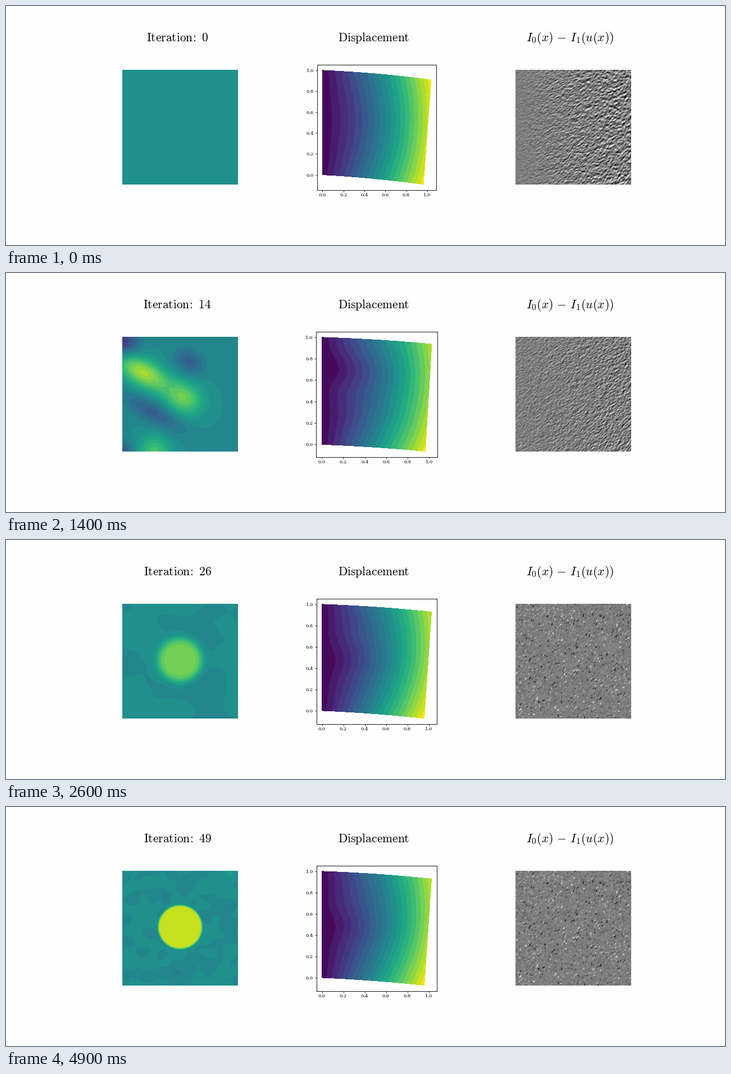
Animation of 1280 by 427 pixels, one loop 5000 ms. Source, as a matplotlib script:

```python
import numpy as np
import matplotlib.pyplot as plt
from matplotlib.animation import FuncAnimation

W, H, DPI = 1280, 427, 64
PT = 72 / DPI            # points per pixel
FRAMES, STEP = 50, 100
COLS, ROWS = 206, 205    # size of the outer panels
TOP, HIGH = 104.7, 224   # middle axes
BG = "#fefefe"

plt.rcParams["mathtext.fontset"] = "cm"
plt.rcParams["font.family"] = "DejaVu Serif"

fig = plt.figure(figsize=(W / DPI, H / DPI), dpi=DPI, facecolor=BG)
rng = np.random.default_rng(7)


def box(x, y, w, h):
    """Pixel box, measured from the top left, as figure fractions."""
    return [x / W, 1 - (y + h) / H, w / W, h / H]


def label(x, text, px):
    return fig.text(x / W, 1 - 63 / H, text, fontsize=px * PT,
                    ha="center", va="baseline", color="black")


def panel(x, cmap):
    ax = fig.add_axes(box(x, 114, COLS, ROWS))
    ax.axis("off")
    return ax.imshow(np.zeros((ROWS, COLS)), cmap=cmap, vmin=0, vmax=1,
                     interpolation="nearest", aspect="auto")


def ease(i, start, end):
    t = np.clip((i - start) / (end - start), 0, 1)
    return t * t * (3 - 2 * t)


def mix(a, b, k):
    return a + (b - a) * k


def bump(x, centre, width):
    return np.exp(-((x - centre) / width)**2)


def decay(i):
    return np.exp(-i / 5)


def kick(i):
    """Short disturbance when the parameter starts to move."""
    return bump(i, 14, 2.5)


def noise(long, short, angle=0, n=256):
    """Smooth random texture of unit spread, stretched along one direction."""
    fy, fx = np.meshgrid(np.fft.fftfreq(n), np.fft.fftfreq(n), indexing="ij")
    a = np.radians(angle)
    f1 = fx * np.cos(a) - fy * np.sin(a)
    f2 = fx * np.sin(a) + fy * np.cos(a)
    kernel = np.exp(-2 * np.pi**2 * ((long * f1)**2 + (short * f2)**2))
    t = np.fft.ifft2(np.fft.fft2(rng.normal(size=(n, n))) * kernel).real
    return (t - t.mean()) / t.std()


# ---- parameter field -------------------------------------------------------
U, V = np.meshgrid((np.arange(COLS) + 0.5) / COLS,
                   (np.arange(ROWS) + 0.5) / ROWS)
COARSE = noise(20, 14)[:ROWS, :COLS]
FINE = noise(8, 7)[:ROWS, :COLS]
RADIUS = np.hypot(U - 0.5, V - 0.49)
FAINT = np.where(U < 0.65 - 0.37 * ease(V, 0.1, 1.2), 0.508, 0.5)


def blob(amp, cx, cy, sx, sy):
    """Soft hill whose long axis falls to the right."""
    p = 0.87 * (U - cx) + 0.5 * (V - cy)
    q = 0.87 * (V - cy) - 0.5 * (U - cx)
    return amp * bump(p, 0, sx) * bump(q, 0, sy)


def wander(k):
    """Hills sliding towards the middle while the valleys fill up."""
    hills = (blob(mix(0.40, 0.30, k), mix(0.17, 0.28, k), mix(0.30, 0.42, k),
                  mix(0.27, 0.14, k), 0.12)
             + blob(0.28, mix(0.54, 0.50, k), mix(0.54, 0.50, k), 0.17, 0.14)
             + blob(mix(0.25, 0.05, k), 0.28, 1, 0.14, 0.14))
    valleys = (blob(-0.32, 0, mix(0, 0.35, k), 0.14, 0.12)
               + blob(mix(-0.2, 0, k), 0.27, 0.66, 0.28, 0.09)
               + blob(mix(-0.2, 0, k), 0.58, 0.22, 0.13, 0.10)
               + blob(-0.2, 0, 1, 0.09, 0.09))
    return 0.475 + hills + valleys


def settle(i):
    """Quiet ground with one disc that sharpens and brightens."""
    k = ease(i, 22, 49)
    ground = 0.482 + 0.016 * mix(COARSE, FINE, k)
    soft = 0.003 + 0.03 * np.exp(-(i - 22) / 8)
    disc = 1 / (1 + np.exp(np.clip((RADIUS - 0.19) / soft, -50, 50)))
    return mix(ground, mix(0.78, 0.91, ease(i, 22, 42)), disc)


def parameter(i):
    if i < 7:
        return np.full_like(U, 0.5)
    if i < 13:
        return FAINT
    f = wander(ease(i, 13, 18))
    if i > 18:
        f = mix(f, settle(i), ease(i, 18, 25))
    return np.round(f * 24) / 24


# ---- displacement ----------------------------------------------------------
X, Y = np.meshgrid(np.linspace(0, 1, 121), np.linspace(0, 1, 121))


def displacement(i, x):
    sag = 0.0715 + 0.0195 * decay(i) - 0.009 * kick(i)
    turn = sag * (0.95 - 0.14 * decay(i))
    pull = -0.008 * (1 - decay(i))
    ux = ((Y - 0.5) * turn + pull * x) * x * (2 - x)
    uy = -sag * (0.55 * x + 0.45 * x**2)
    return ux, uy


def ripple(i):
    """Sideways shift of the contours near the clamped edge."""
    k = ease(i, 13, 20)
    high = 0.08 * kick(i) - 0.03 * k
    low = 0.04 * k - 0.05 * kick(i)
    s = high * bump(Y, 0.72, 0.13) + low * bump(Y, 0.48, 0.13)
    return s * np.minimum(X / 0.1, 1) * bump(X, 0, 0.5)


mid = fig.add_axes(box(553, TOP, 214, HIGH))


def draw_displacement(i):
    ux, uy = displacement(i, X)
    size = np.hypot(*displacement(i, np.maximum(X - ripple(i), 0)))
    px, py = X + ux, Y + uy
    x0, x1, y0, y1 = px.min(), px.max(), py.min(), py.max()
    mx, my = 0.05 * (x1 - x0), 0.05 * (y1 - y0)
    width = HIGH * (x1 - x0) / (y1 - y0)

    mid.clear()
    mid.set_position(box(660 - width / 2, TOP, width, HIGH))
    mid.contourf(px, py, size, levels=20, cmap="viridis")
    mid.set_xticks(np.arange(6) / 5)
    mid.set_yticks(np.arange(6) / 5)
    mid.xaxis.set_major_formatter("{x:.1f}")
    mid.yaxis.set_major_formatter("{x:.1f}")
    mid.set_xlim(x0 - mx, x1 + mx)
    mid.set_ylim(y0 - my, y1 + my)
    mid.tick_params(length=3 * PT, width=0.8 * PT, pad=2.8 * PT,
                    labelsize=8.4 * PT)
    for spine in mid.spines.values():
        spine.set_linewidth(0.9 * PT)


# ---- residual image --------------------------------------------------------
TEXTURE = noise(1.5, 0.85, 35)
SPECK = noise(1.15, 0.65, 50)[:ROWS, :COLS]
SPARSE = (0.03 * SPECK
          + 0.2 * np.sign(SPECK) * np.maximum(np.abs(SPECK) - 1.5, 0))
R, C = np.mgrid[0:ROWS, 0:COLS]


def sample(t, r, c):
    n = len(t)
    r0, c0 = np.floor(r).astype(int), np.floor(c).astype(int)
    a, b = r - r0, c - c0
    r0, c0, r1, c1 = r0 % n, c0 % n, (r0 + 1) % n, (c0 + 1) % n
    return mix(mix(t[r0, c0], t[r0, c1], b), mix(t[r1, c0], t[r1, c1], b), a)


def residual(i):
    """Texture minus its shifted copy; the mismatch dies out over time."""
    left_over = 1 - ease(i, 13, 26)
    near = 0.15 + 0.4 * kick(i)
    far = 1.5 + 1.8 * decay(i)
    shift = left_over * mix(near, far, U)
    turn = 0.8 + 0.6 * decay(i)
    moved = sample(TEXTURE, R + shift * np.sin(turn), C + shift * np.cos(turn))
    specks = mix(1, 0.35, left_over)
    return np.clip(0.49 + 0.13 * (TEXTURE[:ROWS, :COLS] - moved)
                   + specks * SPARSE, 0.08, 0.92)


# ---- stage -----------------------------------------------------------------
left = panel(207, "viridis")
right = panel(907, "gray")
counter = label(305, "", 21.5)
label(655, r"$\mathrm{Displacement}$", 21.5)
label(1004.5, r"$I_0(x)\,-\,I_1(u(x))$", 21.8)


def draw(i):
    counter.set_text(r"$\mathrm{Iteration\!:\ %d}$" % i)
    left.set_data(parameter(i))
    right.set_data(residual(i))
    draw_displacement(i)
    return []


anim = FuncAnimation(fig, draw, frames=FRAMES, interval=STEP,
                     init_func=lambda: draw(0), repeat=True, repeat_delay=0)
plt.show()
```
